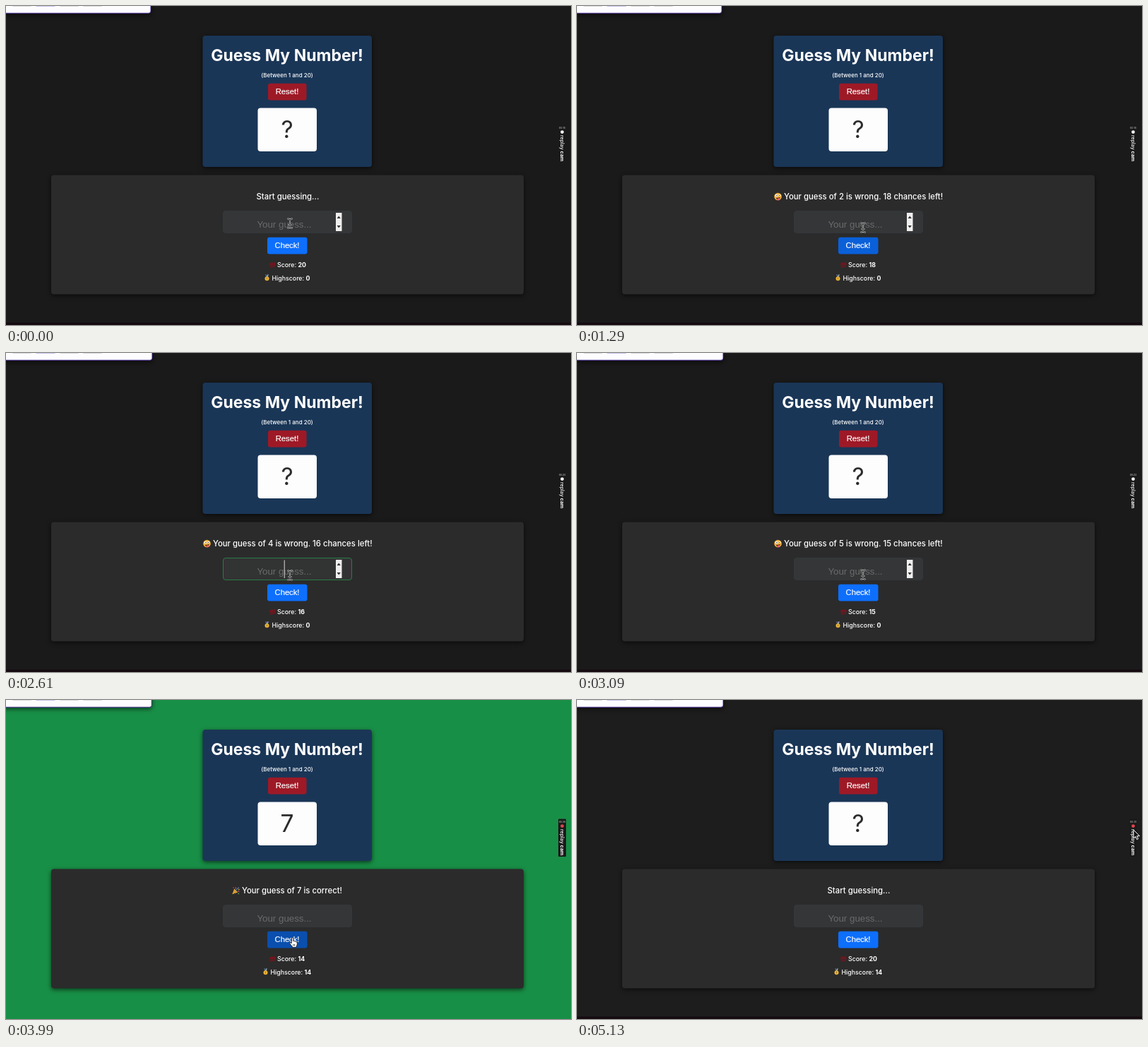
Write an HTML page that moves like this. It is 800 px wide and 452 px high and loops after 5.16 s.

```html
<!DOCTYPE html>
<html lang="en">
<head>
<meta charset="utf-8">
<title>Guess My Number</title>
<style>
  html, body { margin: 0; width: 100%; height: 100%; overflow: hidden; background: #1a1a1a; }
  svg { display: block; width: 100vw; height: 100vh; }
  text { font-family: Inter, Roboto, sans-serif; font-weight: 500; fill: #fff; }
  .mid { text-anchor: middle; }
  .ui { font-family: "Liberation Sans", Arial, sans-serif; font-weight: 400; text-anchor: middle; }
  .label { stroke: #fff; stroke-width: .2; }
  .raised { filter: drop-shadow(0 2px 3px rgba(0, 0, 0, .6)); }
  .stat { font-size: 8.8px; }
  .stat tspan { font-weight: 700; }
</style>
</head>
<body>
<svg viewBox="0 0 800 452">
  <rect id="page" width="800" height="452"/>
  <rect id="strip" y="448.5" width="800" height="4" fill="#160b11"/>

  <g class="raised">
    <rect id="tabBar" x="-5" y="-10" width="210" height="20.2" rx="3" fill="#fdfdff" stroke="#35178a" stroke-width=".9"/>
    <g fill="#d9d9de">
      <rect x="9" y="-3" width="27" height="4" rx="1.5"/>
      <rect x="42" y="-3" width="28" height="4" rx="1.5" fill="#c9c4ee"/>
      <rect x="76" y="-3" width="27" height="4" rx="1.5"/>
      <rect x="109" y="-3" width="27" height="4" rx="1.5"/>
    </g>
  </g>

  <rect class="raised" x="278.5" y="42" width="239.5" height="186" rx="4" fill="#1a3657"/>
  <text class="mid" x="398" y="78" font-size="23" style="font-weight:700">Guess My Number!</text>
  <text class="mid" x="398" y="100.7" font-size="8">(Between 1 and 20)</text>
  <rect id="reset" x="371" y="109.8" width="54.5" height="23.7" rx="3"/>
  <text class="ui label" x="398" y="125.2" font-size="11.3">Reset!</text>
  <rect x="356.5" y="144.5" width="83.5" height="61.5" rx="4" fill="#fdfdfd"/>
  <text id="secret" class="mid" x="398" y="187" font-size="33.6" style="fill:#2b2b2b;font-weight:400"></text>

  <rect class="raised" x="64" y="239.5" width="669" height="169" rx="4" fill="#2b2b2b"/>
  <text id="message" y="274" font-size="11.35"></text>

  <g id="zany" transform="translate(284.5 270)">
    <circle r="5.3" fill="#f2b23c"/>
    <circle cx="-2" cy="-1.4" r="1.9" fill="#fff"/>
    <circle cx="2.2" cy="-1.8" r="1.4" fill="#fff"/>
    <circle cx="-1.7" cy="-1.2" r=".8" fill="#3a2412"/>
    <circle cx="2" cy="-1.6" r=".6" fill="#3a2412"/>
    <path d="M-2.8 1.4Q0 2.4 3.2.8Q2.8 4.2 0 4.2Q-2.2 4-2.8 1.4Z" fill="#5c2412"/>
    <path d="M-.6 2.4H2.4V4.8Q.9 6.4-.6 4.8Z" fill="#ee5a78"/>
  </g>
  <g id="popper" transform="translate(325.5 270)">
    <path d="M-5.2 5.2-2.2-2.4 2.6 2.4Z" fill="#eeb23c"/>
    <path d="M-4 2.2-1.4 3.9M-3-.2.7 3" stroke="#a86818" stroke-width=".8"/>
    <path d="M-1-2Q1-3.4-.6-5M2 1.6Q3.6.2 5 1.6" fill="none" stroke="#e0508c" stroke-width="1"/>
    <path d="M.6-.4Q1.6-3.4 4.4-4.2" fill="none" stroke="#5aa6e8" stroke-width="1"/>
    <circle cx="-3.4" cy="-4" r=".8" fill="#d84848"/>
    <circle cx="4.3" cy="-1.4" r=".8" fill="#f0cc50"/>
    <circle cx="3.8" cy="4.4" r=".8" fill="#62b860"/>
  </g>

  <rect id="field" x="307.5" y="290.5" width="182" height="31" rx="3.5"/>
  <text id="hint" class="ui" x="394" y="313.5" font-size="13.3" style="fill:#6a6b6d">Your guess...</text>
  <text id="typed" class="ui" x="394" y="313.5" font-size="13.3"></text>
  <rect id="caret" x="393.7" y="293.5" width="1" height="25.5" fill="#d8d8d8"/>
  <g id="spinner">
    <rect x="467" y="293" width="8.5" height="26" fill="#efefef"/>
    <path d="M468.6 301h5.2l-2.6-3.4ZM468.6 311h5.2l-2.6 3.4Z" fill="#333"/>
  </g>

  <rect id="check" x="370" y="327.7" width="56.5" height="23.7" rx="3"/>
  <text class="ui label" x="398" y="343.1" font-size="11.2">Check!</text>

  <g transform="translate(377.5 366.3)" fill="none" stroke="#8c0f1c" stroke-width="1.1">
    <path d="M-3.4-2V1.6M-3.6 3.6 3.4 2.4"/>
    <ellipse cx="-1" cy="-.5" rx="1.1" ry="1.7"/>
    <ellipse cx="2.4" cy="-.9" rx="1.1" ry="1.7"/>
  </g>
  <text class="stat" x="384" y="369.5">Score: <tspan id="score"></tspan></text>
  <g id="best">
    <path d="M367.2 380.5h1.6l1.4 4-1.2.6Z" fill="#56779f"/>
    <path d="M371.8 380.5h-1.6l-1.4 4 1.2.6Z" fill="#a8b4c8"/>
    <circle cx="369.5" cy="386.2" r="3" fill="#e8b33a"/>
    <path d="M369.5 384.8v2.8" stroke="#936515" stroke-width=".8"/>
    <text class="stat" x="376.5" y="388.5">Highscore: <tspan id="highscore"></tspan></text>
  </g>

  <rect x="782" y="168.5" width="11" height="53.5" rx="1" fill="#1a1a1a"/>
  <text id="clock" class="mid" x="787.5" y="174" font-size="3.4" style="fill:#bbb"></text>
  <circle id="lamp" cx="787.5" cy="178.6" r="2.4"/>
  <text transform="translate(785 183) rotate(90)" font-size="7">replay <tspan font-weight="700">cam</tspan></text>

  <g id="ibeam" fill="none" stroke-linecap="round">
    <path id="beam" d="M-2.8-6.5Q0-6.5 0-4.5Q0-6.5 2.8-6.5M0-4.5V4.5M-2.8 6.5Q0 6.5 0 4.5Q0 6.5 2.8 6.5M-1.6 2H1.6"/>
  </g>
  <path id="hand" d="M-1.2 1Q-1.2-.4 0-.4T1.2 1V4.6Q2.4 3.9 3.2 5Q4.6 4.4 5.2 5.7Q6.8 5.4 6.8 7.2V9Q6.6 11 5.6 12V13.4H-.2V12.2Q-1.8 10.6-4 7.4Q-3.6 5.8-1.2 7.6ZM1.4 9v2.4M3.2 9v2.4" fill="#fff" stroke="#111" stroke-width=".8" stroke-linejoin="round"/>
  <path id="arrow" d="M0 0V12L2.8 9.4 4.7 13.6 6.6 12.7 4.8 8.7H8.6Z" fill="#111" stroke="#fff" stroke-width="1"/>
</svg>
<script>
const LOOP = 5160, RESET = 4740;
const clicks = [640, 1200, 1740, 2300, 2890, 3480, 3960];
// where the pointer rests in the field before each click
const rests = [[402, 308], [405, 313], [405, 314], [408, 315], [402, 315], [405, 314], [405, 313]];
const el = {};
document.querySelectorAll('[id]').forEach(node => el[node.id] = node);

// light outline below a dark core
const core = el.beam.cloneNode();
core.removeAttribute('id');
el.ibeam.append(core);
[[el.beam, '#d0d0d0', 2], [core, '#222', .9]].forEach(([node, color, width]) => {
  node.setAttribute('stroke', color);
  node.setAttribute('stroke-width', width);
});

const path = [];
clicks.forEach((c, i) => {
  path.push([i ? clicks[i - 1] + 85 : 0, ...rests[i]], [c - 130, ...rests[i]], [c - 65, 405.5, 337], [c + 50, 405.5, 337]);
});
path.push([4260, 405.5, 337], [4560, 400, 121], [4890, 400, 121], [5040, 788, 184], [LOOP, 788, 184]);

function pointer(t) {
  const i = Math.max(1, path.findIndex(p => p[0] > t));
  const [a, b] = [path[i - 1], path[i]];
  const u = Math.min(1, Math.max(0, (t - a[0]) / (b[0] - a[0])));
  const ease = u * u * (3 - 2 * u);
  return [1, 2].map(k => a[k] + (b[k] - a[k]) * ease);
}

function over(node, [x, y]) {
  const at = name => +node.getAttribute(name);
  const dx = x - at('x'), dy = y - at('y');
  return dx >= 0 && dy >= 0 && dx <= at('width') && dy <= at('height');
}

const show = (node, on) => node.style.display = on ? '' : 'none';
const fill = (node, color) => node.setAttribute('fill', color);
const put = (node, text) => { if (node.textContent !== String(text)) node.textContent = text; };

function draw(t) {
  const done = clicks.filter(c => c <= t).length;
  const reset = t >= RESET, won = done === 7 && !reset;
  const guesses = reset ? 0 : done;
  const next = clicks[done];
  const focus = t >= next - 350, typing = t >= next - 170;
  const pos = pointer(t), lagged = pointer(Math.max(0, t - 40));

  fill(el.page, won ? '#188f46' : reset ? '#1d1d1d' : '#1a1a1a');
  show(el.strip, !won);
  el.tabBar.setAttribute('width', t < 1650 ? 210 : won ? 211.3 : 212);

  put(el.secret, won ? 7 : '?');
  put(el.message, won ? 'Your guess of 7 is correct!'
    : guesses ? `Your guess of ${guesses} is wrong. ${20 - guesses} chances left!`
    : 'Start guessing...');
  el.message.setAttribute('x', won ? 334 : guesses ? 293 : 354.5);
  show(el.zany, guesses && !won);
  show(el.popper, won);
  put(el.score, 20 - Math.min(guesses, 6));
  put(el.highscore, done === 7 ? 14 : 0);
  el.best.setAttribute('transform', `translate(${done === 7 ? -2 : 0} 0)`);

  fill(el.field, focus ? '#323333' : '#353637');
  el.field.setAttribute('stroke', focus ? '#2a7b48' : '#33383d');
  show(el.hint, !typing);
  put(el.typed, typing ? done + 1 : '');
  show(el.caret, focus && !typing);
  show(el.spinner, focus || over(el.field, pos));

  const pressed = clicks.some(c => t >= c - 20 && t < c + 40);
  fill(el.check, pressed ? '#0a4fae' : over(el.check, lagged) ? '#0a60d9' : '#0d6ffc');
  fill(el.reset, over(el.reset, lagged) ? '#82131f' : '#9e1926');

  put(el.clock, '00:' + Math.floor(10.5 + t / 250));
  const blink = t % 215;
  fill(el.lamp, blink >= 90 && blink < 198 ? '#e0444e' : '#f4f4f4');

  const kind = over(el.field, pos) ? 'ibeam' : over(el.check, pos) || over(el.reset, pos) ? 'hand' : 'arrow';
  for (const name of ['ibeam', 'hand', 'arrow']) show(el[name], name === kind);
  el[kind].setAttribute('transform', `translate(${pos})`);
}

function tick() {
  draw(performance.now() % LOOP);
  requestAnimationFrame(tick);
}
tick();
</script>
</body>
</html>
```
